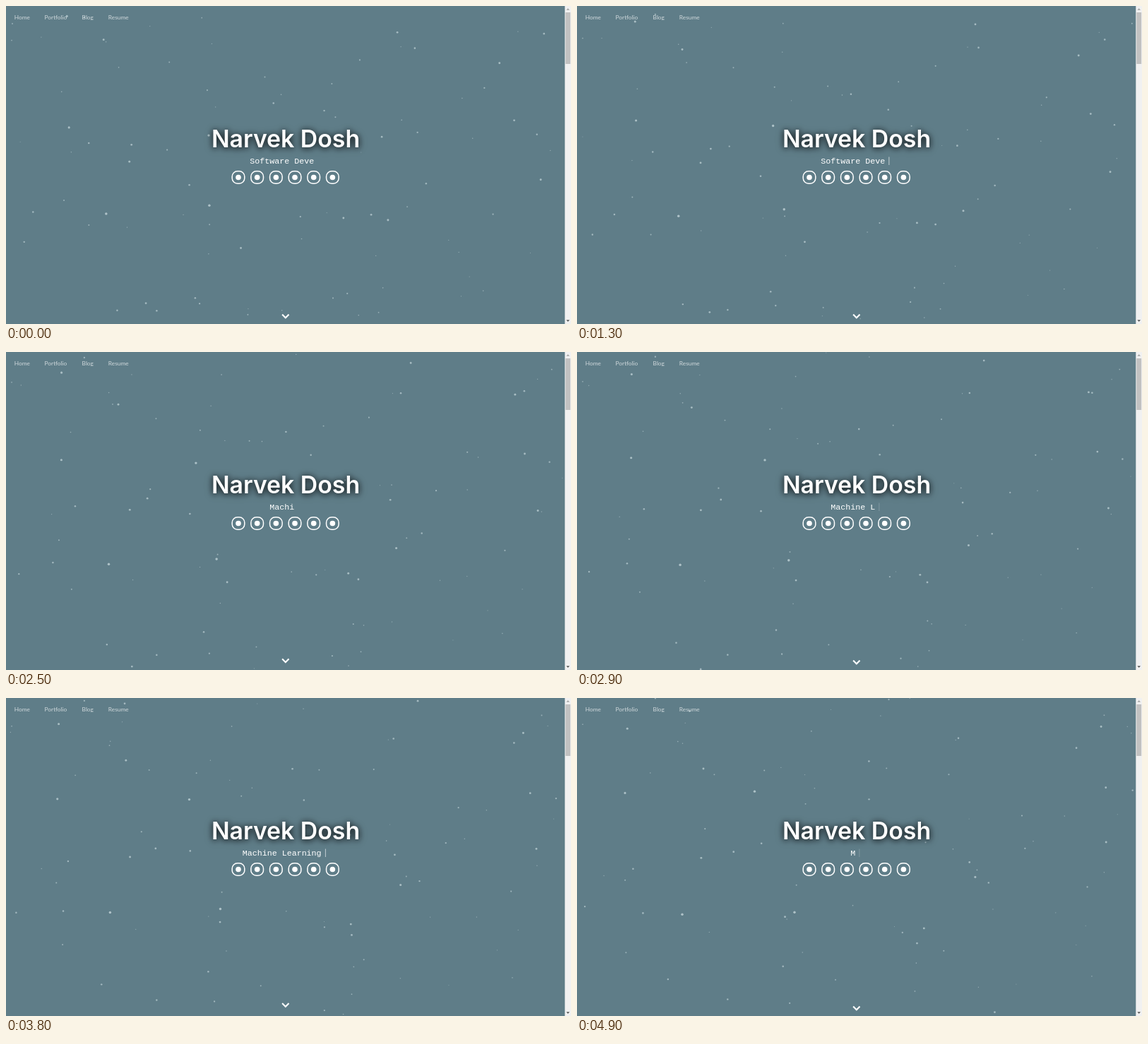
An HTML page that plays this animation: 800x450 px, repeating every 5 s.

```html
<!DOCTYPE html>
<html lang="en">
<head>
<meta charset="utf-8">
<title>Portfolio</title>
<style>
  html, body { margin: 0; width: 100%; height: 100%; overflow: hidden; background: #5f7d88; }
  svg { display: block; width: 800px; height: 450px; }
  .nav { font: 8.33px Lato, sans-serif; fill: #fff; fill-opacity: .7; }
  .name {
    font: 600 33.8px Inter, sans-serif; fill: #fff; text-anchor: middle;
    filter: drop-shadow(0 1px 4px rgba(0, 0, 0, .65)) drop-shadow(0 1px 5px rgba(0, 0, 0, .4));
  }
  .role { font: 11.67px "Liberation Mono", monospace; fill: #fff; }
</style>
</head>
<body>
<svg viewBox="0 0 800 450">
  <g id="dots" fill="#c9dade"></g>
  <g id="nav" class="nav">
    <text x="11.8" y="18.8">Home</text>
    <text x="54.6" y="18.8">Portfolio</text>
    <text x="107.6" y="18.8">Blog</text>
    <text x="144.8" y="18.8">Resume</text>
  </g>

  <text class="name" x="396" y="199.5">Narvek Dosh</text>
  <text class="role" id="role" y="223"></text>
  <rect id="caret" y="213.5" width=".9" height="11.5" fill="#fff"/>
  <g id="links" fill="none" stroke="#fff" stroke-width="1.5"></g>
  <path id="arrow" d="M391.1 436.6l4.7 4.7l4.7-4.7" fill="none" stroke="#fff" stroke-width="2.1"/>

  <rect x="791.3" width="8.7" height="450" fill="#f1f1f1"/>
  <rect x="792.3" y="9" width="6.8" height="73" fill="#c1c1c1"/>
  <path d="M793.4 5.8h4.6l-2.3-2.6z" fill="#a3a3a3"/>
  <path d="M793.4 444.2h4.6l-2.3 2.6z" fill="#505050"/>
</svg>
<script>
const LOOP = 5000, STEP = 100, WIDTH = 791, HEIGHT = 450;
const DOTS = 88, SPEED = 11.5, MAX_R = 1.75;
const $ = id => document.getElementById(id);

function add(parent, tag, attrs) {
  const el = document.createElementNS('http://www.w3.org/2000/svg', tag);
  for (const k in attrs) el.setAttribute(k, attrs[k]);
  return parent.appendChild(el);
}

let seed = 29;
const rnd = () => (seed = seed * 16807 % 2147483647) / 2147483647;
const drift = () => (rnd() * 2 - 1) * SPEED;

// Dots drift in straight lines and re-enter at the opposite edge
const dots = Array.from({ length: DOTS }, () => {
  const r = MAX_R * (.3 + .7 * rnd());
  return {
    x: rnd() * WIDTH, y: rnd() * HEIGHT, vx: drift(), vy: drift(),
    el: add($('dots'), 'circle', { r, opacity: .35 + .4 * r / MAX_R })
  };
});
const wrap = (v, size) => (v + size) % size;

for (let i = 0; i < 6; i++) {
  const x = 329 + i * 26.67;
  add($('links'), 'rect', { x: x - 8.8, y: 233.7, width: 17.6, height: 17.6, rx: 7.6 });
  add($('links'), 'circle', { cx: x, cy: 242.5, r: 3.8, fill: '#fff', stroke: 'none' });
}

// Type at 100 ms per letter, wait, erase at 50 ms per letter
function typed(text, t, start, erase) {
  const n = t < erase
    ? Math.floor((t - start) / 100)
    : text.length - Math.floor((t - erase) / 50);
  return text.slice(0, Math.max(0, n));
}

const blink = t => .4 * (1 - Math.cos((t + 10) / 250 * Math.PI));

// One hop per 1500 ms, at rest for the remainder
function hop(t) {
  const p = ((t + 1000) % 1500) / 600;
  return p < 1 ? -4.5 * Math.sin(p * Math.PI) : 0;
}

function draw(t) {
  for (const d of dots) {
    d.el.setAttribute('cx', wrap(d.x + d.vx * t / 1000, WIDTH));
    d.el.setAttribute('cy', wrap(d.y + d.vy * t / 1000, HEIGHT));
  }
  const text = t < 2000
    ? typed('Software Developer', t, -1300, 1050)
    : typed('Machine Learning', t, 2000, 4150);
  const w = text.length * 7, x = 395.7 - (w + 10) / 2;
  $('role').textContent = text;
  $('role').setAttribute('x', x);
  $('caret').setAttribute('x', x + w + 5.2);
  $('caret').setAttribute('opacity', blink(t));
  $('arrow').setAttribute('transform', `translate(0 ${hop(t)})`);
}

const start = performance.now();
function tick(now) {
  const t = Math.max(0, now - start) % LOOP;
  draw(Math.floor(t / STEP) * STEP);
  requestAnimationFrame(tick);
}
draw(0);
requestAnimationFrame(tick);
</script>
</body>
</html>
```
